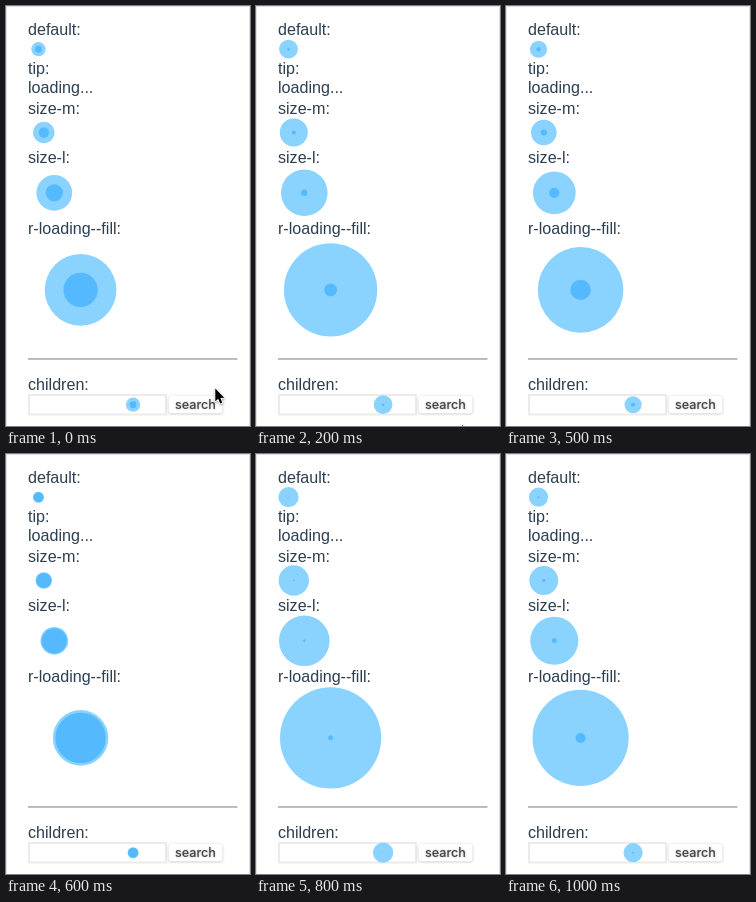
An HTML page with a canvas that plays this animation: 244x420 px, repeating every 1.1 s.

```html
<!DOCTYPE html>
<html lang="en">
<head>
<meta charset="utf-8">
<title>Loading indicators</title>
<style>
html, body { margin: 0; width: 100%; height: 100%; overflow: hidden; background: #fff; }
canvas { display: block; width: 244px; height: 420px; }
</style>
</head>
<body>
<canvas id="stage"></canvas>
<script>
const W = 244, H = 420, LOOP = 1100, STEP = 100;
const LIGHT = '#8ad2ff', DARK = '#54b9fd';
const canvas = document.getElementById('stage');
const ctx = canvas.getContext('2d');
const ratio = window.devicePixelRatio || 1;
canvas.width = W * ratio;
canvas.height = H * ratio;
ctx.scale(ratio, ratio);

const labels = [
  ['default:', 29], ['tip:', 68], ['loading...', 87], ['size-m:', 108],
  ['size-l:', 157], ['r-loading--fill:', 228], ['children:', 384]
];

// centre x, centre y, full radius
const spinners = [
  [32.5, 43.2, 10.6], [37.8, 126.5, 15.9], [48.3, 186.8, 26.5],
  [74.6, 283.9, 53], [127.1, 398.7, 10.6]
];

// cubic-bezier(.42, 0, .58, 1)
function easeInOut(x) {
  let lo = 0, hi = 1;
  for (let i = 0; i < 24; i++) {
    const p = (lo + hi) / 2, q = 1 - p;
    if (1.26 * q * q * p + 1.74 * q * p * p + p * p * p < x) lo = p;
    else hi = p;
  }
  return lo * lo * (3 - 2 * lo);
}

function disc(x, y, r, color) {
  ctx.fillStyle = color;
  ctx.beginPath();
  ctx.arc(x, y, r, 0, Math.PI * 2);
  ctx.fill();
}

function text(str, x, y, font, color) {
  ctx.font = font;
  ctx.fillStyle = color;
  ctx.fillText(str, x, y);
}

function drawPage() {
  ctx.fillStyle = '#fff';
  ctx.fillRect(0, 0, W, H);
  ctx.fillStyle = '#e2e2e2';
  ctx.fillRect(0, 0, W, 1);
  ctx.fillRect(0, 0, 1, H);
  ctx.fillRect(W - 1, 0, 1, H);

  for (const [str, y] of labels) {
    text(str, 22, y, '16.1px "Liberation Sans", Arial, sans-serif', '#2c3e50');
  }
  ctx.fillStyle = '#999';
  ctx.fillRect(22, 352.3, 209.5, 1.3);
}

function drawForm() {
  ctx.strokeStyle = '#ebebeb';
  ctx.lineWidth = 2;
  ctx.strokeRect(23, 389, 137, 19.5);

  ctx.save();
  ctx.shadowColor = 'rgba(0,0,0,.28)';
  ctx.shadowBlur = 2.5 * ratio;
  ctx.shadowOffsetY = 0.6 * ratio;
  ctx.fillStyle = '#fff';
  ctx.beginPath();
  ctx.roundRect(162.5, 390, 54, 17.5, 3);
  ctx.fill();
  ctx.restore();

  ctx.save();
  ctx.shadowColor = 'rgba(60,60,60,.4)';
  ctx.shadowBlur = 2 * ratio;
  text('search', 169, 403, '500 12.6px Inter, Roboto, sans-serif', '#444');
  ctx.restore();
}

function drawCursor(x, y) {
  ctx.save();
  ctx.translate(x, y);
  ctx.scale(0.9, 0.9);
  ctx.beginPath();
  ctx.moveTo(0, 0);
  ctx.lineTo(0, 14.5);
  ctx.lineTo(3.2, 11.5);
  ctx.lineTo(5.5, 16.8);
  ctx.lineTo(7.8, 15.8);
  ctx.lineTo(5.6, 10.6);
  ctx.lineTo(10, 10.4);
  ctx.closePath();
  ctx.lineJoin = 'round';
  ctx.lineWidth = 1.8;
  ctx.strokeStyle = '#fff';
  ctx.shadowColor = 'rgba(0,0,0,.35)';
  ctx.shadowBlur = 2 * ratio;
  ctx.shadowOffsetY = ratio;
  ctx.stroke();
  ctx.shadowColor = 'transparent';
  ctx.fillStyle = '#000';
  ctx.fill();
  ctx.restore();
}

function draw(now) {
  const t = Math.floor((now % LOOP) / STEP) * STEP;
  // two bounces per loop, the two discs half a turn apart
  const phase = (0.395 + 2 * t / LOOP) % 1;
  const big = easeInOut(Math.max(phase, 1 - phase));

  drawPage();
  drawForm();
  for (const [x, y, r] of spinners) {
    disc(x, y, r * big, LIGHT);
    disc(x, y, r * (1 - big), DARK);
  }
  // the pointer leaves through the bottom edge
  drawCursor(209.3 - t * 0.015, 382.5 + t * 0.182);
}

let start;
function tick(now) {
  if (start === undefined) start = now;
  draw(Math.max(0, now - start));
  requestAnimationFrame(tick);
}
draw(0);
requestAnimationFrame(tick);
</script>
</body>
</html>
```
